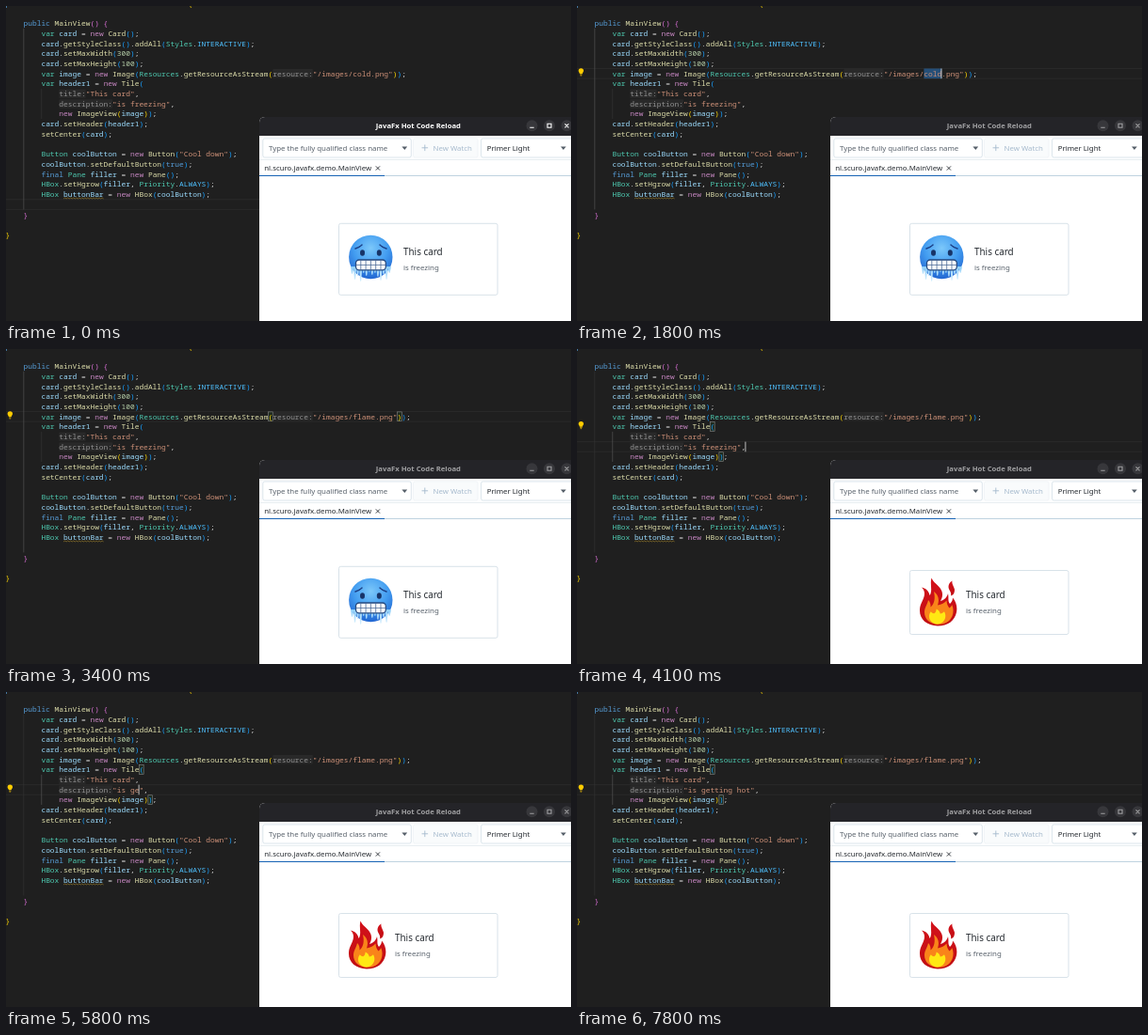
These frames come from a looping animation (600 by 335 pixels, 8 s). An HTML page:

```html
<!DOCTYPE html>
<html lang="en">
<head>
<meta charset="utf-8">
<title>Hot code reload</title>
<style>
  html, body { margin: 0; width: 100%; height: 100%; overflow: hidden; background: #1f1f1f; }
  svg { display: block; width: 100%; height: 100%; }
  text { white-space: pre; }
  #code text { font: 7.88px "Noto Sans Mono", "DejaVu Sans Mono", monospace; }
  #app text { font: 7.85px "Noto Sans", "Open Sans", sans-serif; fill: #24292f; }
  #app #title { font-weight: 600; font-size: 7.7px; }
  #app .heading { font-size: 9.9px; }
  #app .muted { fill: #57606a; }
  #app .off { fill: #a6bacd; }
</style>
</head>
<body>
<svg viewBox="0 0 600 335" preserveAspectRatio="none">
  <defs>
    <radialGradient id="ice" cx=".5" cy=".3" r=".72">
      <stop offset="0" stop-color="#7cc8fa"/>
      <stop offset=".55" stop-color="#429cf0"/>
      <stop offset="1" stop-color="#1f62cf"/>
    </radialGradient>
    <linearGradient id="frost" x2="0" y2="1">
      <stop offset="0" stop-color="#8ccdf8"/>
      <stop offset="1" stop-color="#d8f0fd"/>
    </linearGradient>
    <linearGradient id="fire" x2="0" y2="1">
      <stop offset="0" stop-color="#d3121b"/>
      <stop offset="1" stop-color="#c00d12"/>
    </linearGradient>
  </defs>
  <rect width="600" height="335" fill="#1f1f1f"/>

  <rect id="lineBox" x="-2" width="604" height="10.7" fill="none" stroke="#292929"/>
  <path id="guide4" stroke-width=".6"/>
  <path id="guide8" stroke-width=".6"/>
  <g id="hints" fill="#292929"></g>
  <rect id="selection" height="10.7" fill="#264f78"/>
  <g id="brackets" fill="#1f2b1f" stroke="#888" stroke-width=".6">
    <rect width="4.7" height="9.8"/><rect width="4.7" height="9.8"/>
  </g>
  <g id="code"></g>
  <path id="squiggle" fill="none" stroke="#a8882a" stroke-width=".6"/>
  <rect id="caret" width=".9" height="10.7" fill="#d0d0d0"/>
  <g id="bulb">
    <path d="M-2.7 -1.2a2.7 2.7 0 1 1 5.4 0c0 1.3-1.2 1.7-1.2 2.9h-3c0-1.2-1.2-1.6-1.2-2.9z" fill="#ffcc00"/>
    <path d="M-1.2 2.6h2.4M-.8 3.7h1.6" stroke="#ffcc00" stroke-width=".7"/>
  </g>

  <g id="app">
    <path d="M269 335V124q0-6 6-6H600V335z" fill="#fff"/>
    <path d="M269 138V124q0-6 6-6H600V138z" fill="#242428"/>
    <text id="title" x="437.900" y="130.300" text-anchor="middle">JavaFx Hot Code Reload</text>
    <g id="buttons" fill="none" stroke-width="1.1">
      <g fill="#37373b" stroke="none"><circle cx="558.500" cy="127.300" r="6"/><circle cx="577" cy="127.300" r="6"/><circle cx="595.500" cy="127.300" r="6"/></g>
      <path d="M556.300 129.300h4.400M575 125.300h4v4h-4zM593.500 125.300l4 4m0-4l-4 4"/>
    </g>
    <rect x="269" y="138" width="331" height="26" fill="#fcfdfe"/>
    <path d="M269 163.500H600" stroke="#dce4ea" stroke-width=".6"/>
    <g stroke="#cfdbe4" stroke-width=".7">
      <rect x="272.800" y="141" width="157.500" height="20" rx="2" fill="#fff"/>
      <rect x="432.500" y="141" width="68.500" height="20" rx="2" fill="#f9fbfc" stroke="#eef2f5"/>
      <rect x="504.500" y="141" width="100" height="20" rx="2" fill="#fff"/>
    </g>
    <text class="muted" x="279" y="153.600">Type the fully qualified class name</text>
    <path d="M420.400 149.600h5.800l-2.900 3.300zM589 149.600h5.800l-2.900 3.300z" fill="#57606a"/>
    <path d="M441.500 150.800h6.600m-3.300-3.300v6.600" stroke="#a6bacd" stroke-width=".9"/>
    <text class="off" x="453.500" y="153.600">New Watch</text>
    <text x="510.700" y="153.600">Primer Light</text>
    <text x="274.200" y="175.200">nl.scuro.javafx.demo.MainView</text>
    <path d="M392.800 170.400l4.200 4.200m0-4.200l-4.200 4.200" stroke="#24292f" stroke-width=".9"/>
    <path d="M402 180.500H600" stroke="#bfd3e0"/>
    <path d="M269 180.500H402" stroke="#1763b5"/>

    <g id="coldCard">
      <rect x="353.500" y="231.300" width="168.500" height="76" rx="2" fill="#fff" stroke="#cfdbe4" stroke-width=".8"/>
      <circle cx="387.300" cy="267" r="23.200" fill="url(#ice)"/>
      <path d="M371 258q4-1 7-4M404 258q-4-1-7-4" fill="none" stroke="#1b3f86" stroke-width="1.5" stroke-linecap="round"/>
      <ellipse cx="378.500" cy="262.500" rx="2.500" ry="3.200" fill="#173468"/>
      <ellipse cx="396.300" cy="262.500" rx="2.500" ry="3.200" fill="#173468"/>
      <path id="icicles" fill="url(#frost)"/>
      <rect x="371.500" y="270" width="31.800" height="10.800" rx="3.500" fill="#fff" stroke="#24487f" stroke-width="1.3"/>
      <path d="M371.500 275.400h31.800M376.800 270v10.800m5.300-10.800v10.800m5.300-10.800v10.800m5.300-10.800v10.800m5.300-10.800v10.800" stroke="#4a6796" stroke-width=".8"/>
      <text class="heading" x="422" y="265.300">This card</text>
      <text class="muted" x="422" y="281.300">is freezing</text>
    </g>
    <g id="fireCard">
      <rect x="353.500" y="235.500" width="168.500" height="68" rx="2" fill="#fff" stroke="#cfdbe4" stroke-width=".8"/>
      <path fill="url(#fire)" d="M383 294.500C371 294 363.500 287 364 277c.3-7 5-11 5-17 0-2.500-1.300-5-3-6.500 5 1 8 4.500 8.500 8.500 3.500-5 0-12 2-18.500 2.500 6.500 11 9 11.500 17 .2 3-.8 5.500-2 7.500 4-1 7-4 8-8 1 5-.5 8 2 11 2-2 3-4 3-6.500 4 4.500 5 10.500 4 15.500-2 9-9 14.500-20 14.500z"/>
      <path fill="url(#fire)" d="M398.500 246.500c-1 4 2.500 6 2.500 10 0 3.500-2 5.500-4 6 .8-3-.8-4.800-2-7.300-1.300-3.200 0-6.700 3.500-8.700z"/>
      <path fill="#f9841a" d="M383 293C374 292 369 287 369 280c0-5 3-8 4-13 2 2 2.800 4.500 2.500 7.500 4.500-4 5-10 3.500-16.500 5 3.500 6 9 4 14.500 4-.5 7.500-2.500 9.500-5 .3 3.500 1 5.500 3 8 1.200-.8 2-1.800 2.700-3.500 1.800 4 1.800 8 .3 12-2.500 6-8 9-15.500 9z"/>
      <path fill="#ffe813" d="M382.500 292.500c-5.500-.5-8.700-4-8.500-8.500.1-2 .9-3.500 1.800-4.700.9 1.300 2 1.900 3.400 2 1.500-1 2.300-2.500 2.500-4.800 2.300 1 3.600 2.700 4.100 5 1.700-.2 3-.9 4.200-2.200 1.200 2 1.600 4.200 1.100 6.500-1 4.300-4.300 6.700-8.600 6.700z"/>
      <text class="heading" x="413" y="265.400">This card</text>
      <text class="muted" x="413" y="281.400">is freezing</text>
    </g>
  </g>
</svg>
<script>
const LOOP = 8000, CH = 4.728, PITCH = 10.71;
const $ = id => document.getElementById(id);
const colX = col => col * CH - 0.4;
const rowY = row => 18.3 + row * PITCH;
const rowTop = row => rowY(row) - PITCH / 2;

function make(tag, attrs, parent) {
  const el = document.createElementNS("http://www.w3.org/2000/svg", tag);
  set(el, attrs);
  parent.append(el);
  return el;
}
function set(el, attrs) {
  for (const key in attrs) el.setAttribute(key, attrs[key]);
}
const show = (el, on) => { el.style.display = on ? "" : "none"; };

// Inlay hints are wrapped in ‹ ›. The first line is scrolled almost out of view.
const FIRST_ROW = -2;
const source = (image, mood) => `public class MainView extends BorderPane {

    public MainView() {
        var card = new Card();
        card.getStyleClass().addAll(Styles.INTERACTIVE);
        card.setMaxWidth(300);
        card.setMaxHeight(100);
        var image = new Image(Resources.getResourceAsStream(‹resource:›"/images/${image}.png"));
        var header1 = new Tile(
            ‹title:›"This card",
            ‹description:›"is ${mood}",
            new ImageView(image));
        card.setHeader(header1);
        setCenter(card);

        Button coolButton = new Button("Cool down");
        coolButton.setDefaultButton(true);
        final Pane filler = new Pane();
        HBox.setHgrow(filler, Priority.ALWAYS);
        HBox buttonBar = new HBox(coolButton);

    }

}`.split("\n");

const KEYWORDS = ["public", "class", "extends", "final", "true"];
const PAIRS = ["#ffd700", "#da70d6", "#179fff"];

function wordColor(word, next) {
  if (word === "new") return "#c586c0";
  if (KEYWORDS.includes(word)) return "#569cd6";
  if (/^\d/.test(word)) return "#b5cea8";
  if (/^[A-Z]{2,}$/.test(word)) return "#4fc1ff";
  if (next === "(") return "#dcdcaa";
  return word === "var" || /^[A-Z]/.test(word) ? "#4ec9b0" : "#9cdcfe";
}

function drawCode(lines) {
  const code = $("code");
  code.replaceChildren();
  let depth = 0;
  lines.forEach((line, i) => {
    const body = line.trimStart();
    if (!body) return;
    const text = make("text", { x: colX(line.length - body.length), y: rowY(i + FIRST_ROW) + 2.8 }, code);
    for (const m of body.matchAll(/"[^"]*"|‹[^›]*›|\w+|[(){}]|\s+|./g)) {
      let token = m[0], fill = "#d4d4d4";
      if (token[0] === '"') fill = "#ce9178";
      else if (token[0] === "‹") { fill = "#919191"; token = token.slice(1, -1); }
      else if (/\w/.test(token)) fill = wordColor(token, body[m.index + token.length]);
      else if (/[({]/.test(token)) fill = PAIRS[depth++ % 3];
      else if (/[)}]/.test(token)) fill = PAIRS[--depth % 3];
      make("tspan", { fill }, text).textContent = token;
    }
  });
}

// Typed words: the text and the moment of each key.
const FLAME = { word: "flame", at: [2000, 2100, 2300, 2400, 2600], row: 5, col: 78 };
const HOT = { word: "getting hot", at: [5300, 5700, 5850, 6000, 6200, 6300, 6400, 6600, 6700, 6900, 7000], row: 8, col: 28 };
const typed = (job, before, t) => job.word.slice(0, job.at.filter(k => k <= t).length) || before;
const keys = job => job.at.map((at, i) => [at, job.row, job.col + i + 1]);

// Caret moves: time, row, column, selection start, selection length.
const MOVES = [
  [0, 18, 8],
  [1400, 5, 80], [1500, 5, 82, 78, 4],
  ...keys(FLAME),
  [3800, 6, 31], [4000, 7, 30], [4100, 8, 38], [4600, 8, 36],
  [4900, 8, 28, 28, 8],
  ...keys(HOT)
];
const BULB = [[0, -9], [1700, 5], [3900, 6], [4300, 8]];
const FOCUS = 1400, RELOAD = 3600;
const latest = (list, t) => list.filter(e => e[0] <= t).pop();

for (const [row, col, n] of [[5, 60, 9], [7, 12, 6], [8, 12, 12]])
  make("rect", { x: colX(col), y: rowTop(row) + 0.6, width: n * CH, height: 9.5, rx: 1 }, $("hints"));

const guide = (col, from, to) => `M${colX(col) + 0.3} ${rowTop(from)}V${rowTop(to + 1)}`;
set($("guide4"), { d: guide(4, 1, 18) });
set($("guide8"), { d: guide(8, 7, 9) });

let wave = `M${colX(13)} ${rowY(17) + 4.6}`;
for (let i = 0; i < 28; i++) wave += `l${9 * CH / 28} ${i % 2 ? 1 : -1}`;
set($("squiggle"), { d: wave });

let ice = "M366 277";
[7, 13, 9, 15, 6, 9, 5, 8, 6, 10, 14, 8, 13, 6].forEach((h, i) => {
  const x = 366 + i * 3.05;
  ice += `L${x + 0.9} ${277 + h}q.6 2 1.2 0L${x + 3.05} 279`;
});
set($("icicles"), { d: ice + "V277z" });

function placeBrackets(t, image) {
  const call = t >= 2000 && t < 3800;
  const tile = t >= 3800 && t < 4900 || t >= 5300;
  show($("brackets"), call || tile);
  const ends = call ? [[5, 59], [5, 83 + image.length]] : [[6, 30], [9, 32]];
  ends.forEach(([row, col], i) => set($("brackets").children[i], { x: colX(col), y: rowTop(row) + 0.4 }));
}

let drawn = "";
function render(t) {
  const image = typed(FLAME, "cold", t), mood = typed(HOT, "freezing", t);
  if (drawn !== image + mood) {
    drawn = image + mood;
    drawCode(source(image, mood));
  }

  const [since, row, col, from = 0, count = 0] = latest(MOVES, t);
  const inTile = row >= 7 && row <= 9;
  set($("lineBox"), { y: rowTop(row) });
  set($("guide4"), { stroke: inTile ? "#363636" : "#5c5c5c" });
  set($("guide8"), { stroke: inTile ? "#5c5c5c" : "#363636" });
  set($("selection"), { x: colX(from), y: rowTop(row), width: count * CH });
  set($("caret"), { x: colX(col) - 0.8, y: rowTop(row) });
  show($("caret"), t >= FOCUS && Math.floor((t - since) / 500) % 2 === 0);
  placeBrackets(t, image);
  set($("bulb"), { transform: `translate(4.3 ${rowY(latest(BULB, t)[1]) - 1.6})` });

  const tone = t < FOCUS ? "#ffffff" : "#a0a0a2";
  $("title").style.fill = tone;
  set($("buttons"), { stroke: tone });
  show($("coldCard"), t < RELOAD);
  show($("fireCard"), t >= RELOAD);
}

const start = performance.now();
function tick() {
  render((performance.now() - start) % LOOP);
  requestAnimationFrame(tick);
}
tick();
</script>
</body>
</html>
```
